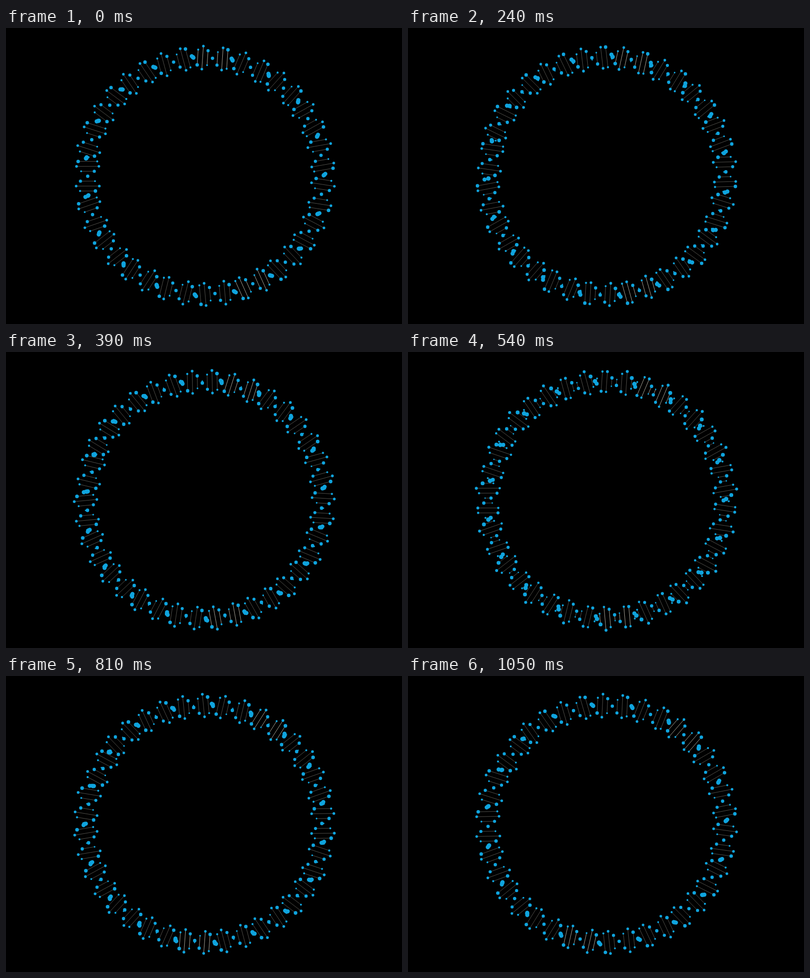
Write an HTML page that moves like this. It is 800 px wide and 600 px high and loops after 1080 ms.

```html
<!DOCTYPE html>
<html lang="en">
<head>
<meta charset="utf-8">
<title>Helix ring</title>
<style>
  html, body { margin: 0; width: 100%; height: 100%; overflow: hidden; background: #000; }
  svg { display: block; width: 800px; height: 600px; }
  path { fill: none; }
  #dim { stroke: #64625c; stroke-width: .8; }
  #bright { stroke: #b8b4a6; stroke-width: .9; }
  #dots { fill: #0fa4de; }
</style>
</head>
<body>
<svg viewBox="0 0 800 600">
  <path id="dim"/>
  <path id="bright"/>
  <path id="dots"/>
</svg>
<script>
const FRAME_MS = 30, FRAMES = 36;
const CENTER = { x: 400.9, y: 300 };
const BLOCKS = 19, BLOCK_ANGLE = 19, RADIUS = 239.2;
const START_ANGLE = 188.4, TURN_PER_FRAME = 19 / 18;
const RUNG_GAP = 10, SLIDE_FRAMES = 7, LAST_RUNG = 8.2;
const BRIGHT_BLOCKS = [4, 12];
// Half height of the helix at every half rung along a block.
const PROFILE = [1.5, 6, 15.5, 20.8, 23.4, 20.2, 14.7, 7.5, 0,
                 7, 13.3, 19, 22.6, 23.8, 19.3, 9.5, 2];

const layer = id => document.getElementById(id);
const rad = deg => deg * Math.PI / 180;
const point = p => p.x.toFixed(2) + ' ' + p.y.toFixed(2);

function halfHeight(k) {
  const i = Math.min(Math.floor(k * 2), PROFILE.length - 2);
  return PROFILE[i] + (PROFILE[i + 1] - PROFILE[i]) * Math.min(1, k * 2 - i);
}

function circle(p, r) {
  const d = (2 * r).toFixed(2), a = r.toFixed(2);
  return `M${(p.x - r).toFixed(2)} ${p.y.toFixed(2)}` +
    `a${a} ${a} 0 1 1 ${d} 0a${a} ${a} 0 1 1 -${d} 0z`;
}

// Maps along/outward distances in a straight block to the stage.
function blockSpace(angle, radius) {
  const c = Math.cos(rad(angle)), s = Math.sin(rad(angle));
  return (along, out) => ({
    x: CENTER.x + c * (radius + out) - s * along,
    y: CENTER.y + s * (radius + out) + c * along
  });
}

function draw(frame) {
  let dim = '', bright = '', dots = '';
  const slide = (SLIDE_FRAMES - frame % SLIDE_FRAMES) % SLIDE_FRAMES / SLIDE_FRAMES;
  for (let i = 0; i < BLOCKS; i++) {
    const angle = START_ANGLE + frame * TURN_PER_FRAME + (i + .5) * BLOCK_ANGLE;
    const at = blockSpace(angle, i === BLOCKS - 1 ? RADIUS - 3.4 : RADIUS);
    dots += circle(at(-39.5, -.6), 4.5);
    for (let k = slide; k <= LAST_RUNG; k++) {
      const along = Math.max(-38.5, Math.min(38.5, (k - 4) * RUNG_GAP));
      const height = halfHeight(k) * (k < 4 ? -1 : 1);
      const depth = Math.cos(k * Math.PI / 4);
      const front = at(along, height), back = at(along, -height);
      const line = `M${point(front)}L${point(back)}`;
      if (BRIGHT_BLOCKS.includes(i)) bright += line; else dim += line;
      dots += circle(front, 2.7 + .9 * depth + .6 * depth ** 3) +
        circle(back, 2.65 - .75 * depth);
    }
  }
  layer('dim').setAttribute('d', dim);
  layer('bright').setAttribute('d', bright);
  layer('dots').setAttribute('d', dots);
}

const start = performance.now();
function tick() {
  const elapsed = performance.now() - start;
  draw(Math.floor(elapsed / FRAME_MS) % FRAMES);
  requestAnimationFrame(tick);
}
tick();
</script>
</body>
</html>
```
